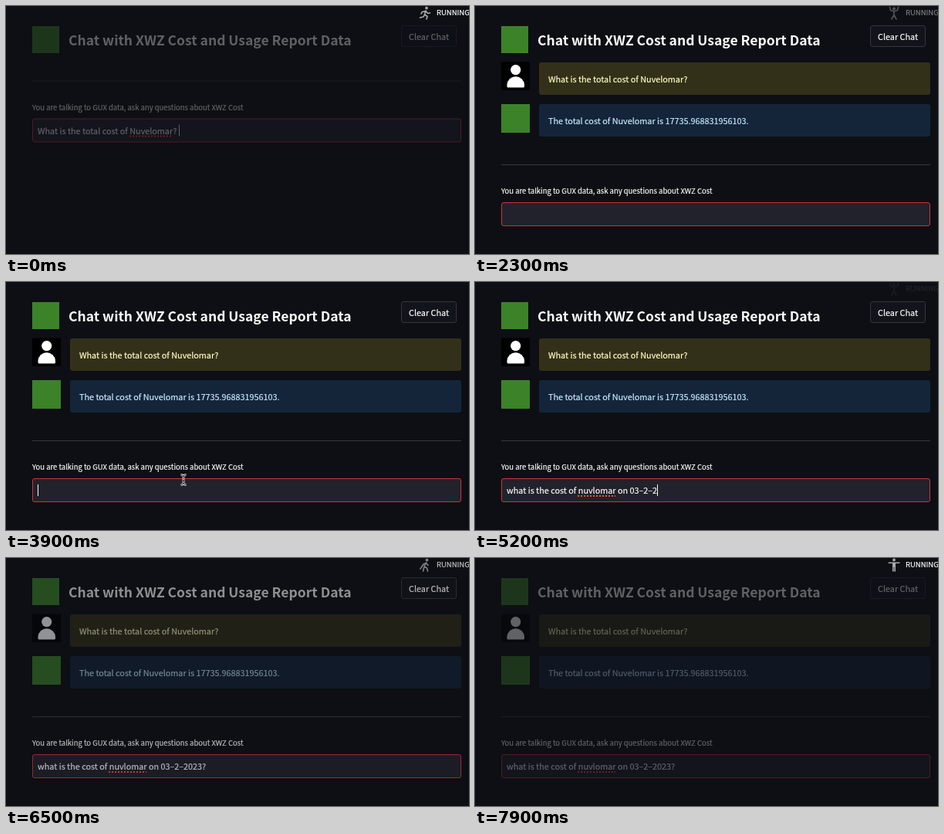
An HTML page for the animation above (8 s loop, 600x321 px).

```html
<!DOCTYPE html>
<html lang="en">
<head>
<meta charset="utf-8">
<title>Cost chat</title>
<style>
  html, body { margin: 0; width: 100%; height: 100%; overflow: hidden; background: #0d0f14; }
  body {
    position: relative; color: #fafafa; white-space: pre; -webkit-text-stroke: .2px;
    font: 10.82px "Noto Sans CJK SC", "Noto Sans CJK JP", "Noto Sans CJK", "Open Sans", sans-serif;
  }
  body * { position: absolute; box-sizing: border-box; }
  span, i, svg * { position: static; }

  .dim, .widgets { inset: 0; animation: dim 8s linear infinite; }
  .widgets { animation-name: dim-late; }
  .panel { inset: 0; animation: panel 8s step-end infinite; }
  .chat { inset: 0; animation: chat 8s step-end infinite; }

  .logo { left: 34px; background: #3c8229; }
  h1 { margin: 0; left: 81px; top: 29px; font-size: 17.5px; line-height: 30px; font-weight: 600; -webkit-text-stroke: 0; }
  .button {
    left: 512px; top: 25px; width: 72px; height: 28px; line-height: 26px; text-align: center;
    border: 1px solid #34363c; border-radius: 3px; background: #11141a;
  }
  .bubble { left: 83px; width: 506.5px; height: 42px; line-height: 42px; padding-left: 12px; border-radius: 3px; }
  .ask { top: 72.5px; background: #33301a; color: #ffffc2; }
  .reply { top: 127px; background: #142539; color: #c7ebff; }
  .avatar { left: 34px; top: 72px; }
  .rule { left: 34px; top: 205px; width: 555.5px; height: 1px; background: #36383e; }
  .label { left: 34px; top: 230px; font-size: 9.47px; line-height: 19px; }
  .input {
    left: 34px; top: 254px; width: 556px; height: 31px; line-height: 29px; padding-left: 6px;
    border: 1px solid #c8363a; border-radius: 3px; background: #21222b;
  }
  #word { text-decoration: underline dotted #ff4b4b 1.5px; text-underline-offset: 2px; }
  .caret {
    display: inline-block; width: 1px; height: 15px; margin-right: -1px;
    vertical-align: -3px; background: #fafafa; animation: caret 8s step-end infinite;
  }

  .status { inset: 0; overflow: hidden; animation: status 8s linear infinite; }
  .status div { left: 558px; top: 0; font-size: 9.47px; line-height: 17px; }
  .figure { left: 535px; top: 0; fill: none; stroke: #a8a9ab; stroke-width: 1.6; stroke-linecap: round; stroke-linejoin: round; }
  .figure circle { fill: #a8a9ab; stroke: none; }
  .figure g { opacity: 0; animation: pose 1s step-end infinite; animation-delay: calc(var(--n) * .2s - 1s); }
  .mouse { left: 225px; top: 248px; animation: mouse 8s infinite; }

  @keyframes dim {
    0%, 25% { opacity: .35; }
    28.75% { opacity: 1; }
    71.25% { opacity: 1; animation-timing-function: ease-in; }
    83.75%, 100% { opacity: .35; }
  }
  @keyframes dim-late {
    0%, 25% { opacity: .35; }
    28.75% { opacity: 1; }
    74.5% { opacity: 1; animation-timing-function: ease-in; }
    86% , 100% { opacity: .35; }
  }
  @keyframes panel { 0% { transform: translateY(-108.5px); } 25%, 100% { transform: none; } }
  @keyframes chat { 0% { opacity: 0; } 25%, 100% { opacity: 1; } }
  @keyframes status { 0%, 25% { opacity: 1; } 32%, 63% { opacity: 0; } 87%, 100% { opacity: 1; } }
  @keyframes pose { 0% { opacity: 1; } 20%, 100% { opacity: 0; } }
  @keyframes caret {
    0%, 12.5%, 20%, 36.25%, 45% { opacity: 1; }
    6.25%, 16.25%, 25%, 40%, 77.5%, 100% { opacity: 0; }
  }
  @keyframes mouse {
    0%, 39.99% { opacity: 0; transform: translate(112px, 12px); }
    40% { opacity: 1; transform: translate(112px, 12px); animation-timing-function: ease-in-out; }
    47.5%, 51.24% { opacity: 1; transform: none; }
    51.25%, 100% { opacity: 0; transform: none; }
  }
</style>
</head>
<body>
  <div class="dim">
    <div class="logo" style="top:26px;width:35px;height:35px"></div>
    <h1>Chat with XWZ Cost and Usage Report Data</h1>
    <div class="chat">
      <svg class="avatar" width="37" height="37">
        <path d="M0 .5H37V37H0Z"/>
        <g fill="#fff"><circle cx="18.7" cy="10.6" r="6.6"/><path d="M7.500 32V29.500A11.300 11.300 0 0 1 30 29.500V32Q30 33.500 28.500 33.500H9Q7.500 33.500 7.500 32Z"/></g>
      </svg>
      <div class="bubble ask">What is the total cost of Nuvelomar?</div>
      <div class="logo" style="top:127px;width:37px;height:37px"></div>
      <div class="bubble reply">The total cost of Nuvelomar is 17735.968831956103.</div>
    </div>
  </div>

  <div class="widgets">
    <div class="button">Clear Chat</div>
    <div class="panel">
      <div class="rule"></div>
      <div class="label">You are talking to GUX data, ask any questions about XWZ Cost</div>
      <div class="input"><span id="before"></span><span id="word"></span><span id="after"></span><i class="caret"></i></div>
    </div>
  </div>

  <div class="status">
    <svg class="figure" width="16" height="18">
      <g style="--n:0"><circle cx="10" cy="2.600" r="1.900"/><path d="M9 6L7.500 11L11 13.500L10 17M7.500 11L6 14L1.500 15M9 6.500L4.500 7.500L3 10M9 6.500L11.500 9.500L14.500 9"/></g>
      <g style="--n:1"><circle cx="8" cy="3.500" r="1.900"/><path d="M8 7V11.500L5 17M8 11.500L11 17M8 7L3.500 5.500L2.500 1.500M8 7L12.500 5.500L13.500 1.500"/></g>
      <g style="--n:2"><circle cx="10.500" cy="2.600" r="1.900"/><path d="M9.500 6L7 11L10.500 13L11.500 17M7 11L5.500 17M9.500 6.500L12 9.500M9.500 6.500L6 8L2 14"/></g>
      <g style="--n:3"><circle cx="9" cy="2.600" r="1.900"/><path d="M8 6L7 11L11 12L12 16.500M7 11L3 16.500M8 6.500L13 7.500M8 6.500L3 9"/></g>
      <g style="--n:4"><circle cx="8" cy="2.500" r="1.900"/><path d="M1.200 6.200H14.800M6.800 6.500V17M9.200 6.500V17M8 7V11"/></g>
    </svg>
    <div>RUNNING</div>
  </div>

  <svg class="mouse" width="10" height="16" fill="none">
    <defs><path id="beam" d="M1.500 1.500Q5 1.500 5 4V12Q5 14.500 1.500 14.500M8.500 1.500Q5 1.500 5 4M5 12Q5 14.500 8.500 14.500M3.500 9.500H6.500"/></defs>
    <use href="#beam" stroke="#fff" stroke-width="2.6"/>
    <use href="#beam" stroke="#15161a"/>
  </svg>

<script>
  const first = ["What is the total cost of ", "Nuvelomar", "? "];
  const second = ["what is the cost of ", "nuvlomar", " on 03–2–2023?"];
  const slots = ["before", "word", "after"].map(id => document.getElementById(id));
  const length = second.join("").length;

  // Leaves the first n characters of the three parts.
  const cut = (parts, n) => parts.map(part => {
    const shown = part.slice(0, Math.max(0, n));
    n -= part.length;
    return shown;
  });

  function draw() {
    const t = performance.now() % 8000;
    const typed = Math.min(1, Math.max(0, (t - 4100) / 1200));
    const parts = t < 2000 ? first : cut(second, Math.floor(typed * length));
    slots.forEach((slot, i) => {
      if (slot.textContent !== parts[i]) slot.textContent = parts[i];
    });
    requestAnimationFrame(draw);
  }
  draw();
</script>
</body>
</html>
```
